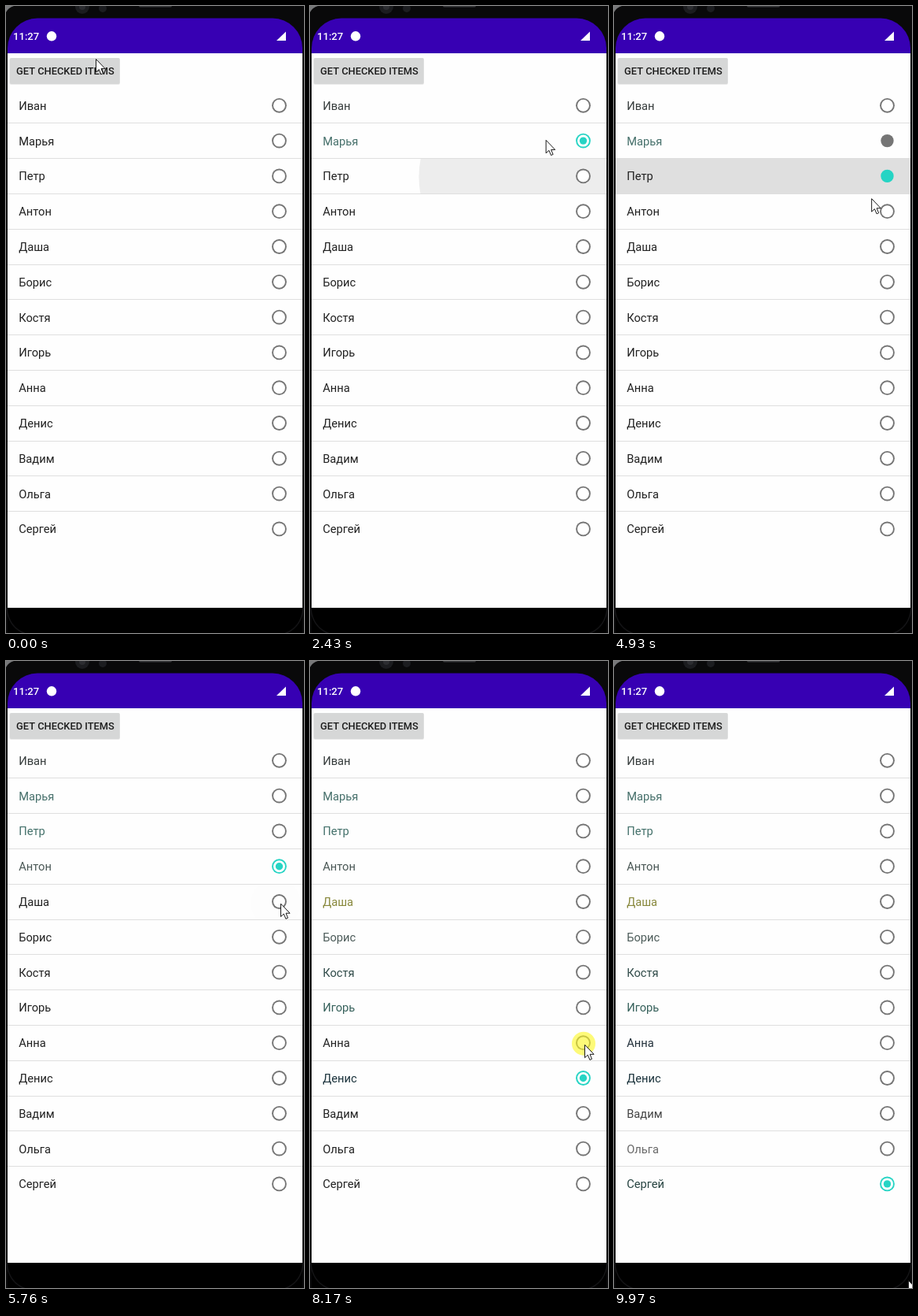
An HTML page with a canvas for the animation above (10 s loop, 379 px wide and 796 px high).

```html
<!DOCTYPE html>
<html lang="ru">
<head>
<meta charset="utf-8">
<style>
html, body { margin: 0; width: 100%; height: 100%; overflow: hidden; background: #000; }
canvas { display: block; width: 379px; height: 796px; }
</style>
</head>
<body>
<canvas id="stage"></canvas>
<script>
const W = 379, H = 796, LOOP = 10000;
const canvas = document.getElementById('stage');
const dpr = window.devicePixelRatio || 1;
canvas.width = W * dpr;
canvas.height = H * dpr;
const ctx = canvas.getContext('2d');

// Label and the colour it keeps after being tapped
const ROWS = [
  ['Иван', '#363c3c'], ['Марья', '#46706b'], ['Петр', '#43706a'], ['Антон', '#4a5755'],
  ['Даша', '#87873a'], ['Борис', '#4c5b59'], ['Костя', '#2f4a48'], ['Игорь', '#35605a'],
  ['Анна', '#22303a'], ['Денис', '#1a323b'], ['Вадим', '#444444'], ['Ольга', '#686868'],
  ['Сергей', '#264340']
];
const STEP = 44.8, FIRST = 126.3, RADIO_X = 347.5;
const GRAY = [117, 117, 117], TEAL = [38, 212, 196];
const LAG = 275, PRESS = 120, TURN = 333;

const clamp = v => Math.max(0, Math.min(1, v));
const lerp = (a, b, k) => a + (b - a) * k;
const ramp = (t, a, b) => clamp((t - a) / (b - a));
const mix = (a, b, k) => `rgb(${a.map((v, i) => Math.round(lerp(v, b[i], k)))})`;
const rowY = i => FIRST + STEP * i;

// Runs of evenly spaced taps; the list answers LAG ms after each press
const run = (rows, start, gap) =>
  rows.map((row, i) => ({ row, change: start + gap * i, down: start + gap * i - LAG }));
const TAPS = [
  ...run([0, 1, 2], 1400, 550),
  ...run([0, 1, 2], 3900, 432),
  ...run([3, 4, 5], 5340, 575),
  ...run([6, 7, 9], 7000, 350),
  ...run([8, 10, 11, 12], 8400, 350)
];

// The pointer rests on every tap and passes a few points between them
const PATH = [
  { t: 30, x: 114, y: 67 }, { t: 300, x: 49, y: 85 }, { t: 1020, x: 352, y: 172 },
  { t: 2430, x: 300, y: 170 }, { t: 2970, x: 108, y: 82 }, { t: 3170, x: 108, y: 82 },
  { t: 3770, x: 336, y: 136 }, { t: 4930, x: 327, y: 244 }, { t: 9970, x: 374, y: 786 },
  ...TAPS.flatMap(({ row, down }) =>
    [down, down + PRESS].map(t => ({ t, x: 349, y: rowY(row) + 2 })))
].sort((a, b) => a.t - b.t);

function pointerAt(t) {
  const i = PATH.findIndex(p => p.t > t);
  if (i < 1) return PATH[i === 0 ? 0 : PATH.length - 1];
  const a = PATH[i - 1], b = PATH[i], k = ramp(t, a.t, b.t);
  return { x: lerp(a.x, b.x, k), y: lerp(a.y, b.y, k) };
}

function box(x, y, w, h, color) {
  ctx.fillStyle = color;
  ctx.fillRect(x, y, w, h);
}

function disc(x, y, r, color) {
  ctx.fillStyle = color;
  ctx.beginPath();
  ctx.arc(x, y, Math.max(0, r), 0, Math.PI * 2);
  ctx.fill();
}

function roundBox(x, y, w, h, radii, color) {
  ctx.fillStyle = color;
  ctx.beginPath();
  ctx.roundRect(x, y, w, h, radii);
  ctx.fill();
}

function poly(points, color) {
  ctx.fillStyle = color;
  ctx.beginPath();
  points.forEach(([x, y]) => ctx.lineTo(x, y));
  ctx.closePath();
  ctx.fill();
}

function label(text, x, y, size, weight, color) {
  ctx.font = `${weight} ${size}px Roboto, sans-serif`;
  ctx.fillStyle = color;
  ctx.fillText(text, x, y);
}

function drawPhone() {
  box(0, 0, W, H, '#09090a');
  ctx.fillStyle = '#77787a';
  ctx.beginPath();
  ctx.moveTo(0, 0);
  ctx.lineTo(10, 0);
  ctx.quadraticCurveTo(3, 2, 0, 8);
  ctx.fill();
  disc(97, 1, 9, '#1b1c1f');
  disc(97, 1, 4, '#2c2d31');
  disc(123, 3, 5, '#1c1d20');
  roundBox(169, -4, 42, 5.5, 2, '#37383a');
  roundBox(2, 15.5, 375, 780, [38, 38, 0, 0], '#3700b3');
  box(2, 60, 375, 704, '#fefefe');
  box(2, 764, 375, 32, '#000');
  ctx.strokeStyle = '#141416';
  ctx.lineWidth = 1.5;
  for (const [edge, side] of [[1, 1], [W - 1, -1]]) {
    ctx.beginPath();
    ctx.moveTo(edge, 764);
    ctx.quadraticCurveTo(edge + side * 2, 789, edge + side * 24, 797);
    ctx.stroke();
  }
}

function drawStatus() {
  label('11:27', 9, 43, 13.1, 500, '#fff');
  disc(58, 38.3, 6.2, '#fff');
  poly([[344, 44], [356, 44], [356, 32.5]], '#fff');
}

function drawButton(t) {
  const k = ramp(t, 2850, 2960) * (1 - ramp(t, 3850, 3950));
  roundBox(4.5, 66, 140.5, 33.8, 2, 'rgba(0,0,0,.1)');
  roundBox(5, 66, 139.5, 33, 2, mix([214, 215, 215], [186, 186, 186], k));
  label('GET CHECKED ITEMS', 13, 87, 12.85, 500, '#1c1c1c');
}

function drawRipple(t, { row, down, change }) {
  const p = ramp(t, change - 160, change);
  const alpha = 0.12 * p * (1 - ramp(t, change + 170, change + 230));
  if (alpha <= 0) return;
  const touch = pointerAt(down), y = rowY(row);
  ctx.save();
  ctx.beginPath();
  ctx.rect(2, y - STEP / 2, 375, STEP);
  ctx.clip();
  disc(lerp(touch.x, W / 2, p), lerp(touch.y, y, p), lerp(26, 191, p), `rgba(0,0,0,${alpha})`);
  ctx.restore();
}

// k runs from 0 (empty ring) through 0.5 (solid) to 1 (ring and dot)
function drawRadio(row, k, color) {
  const y = rowY(row);
  const solid = 1 - Math.abs(2 * k - 1);
  disc(RADIO_X, y, 9.4 - 1.2 * solid, color);
  disc(RADIO_X, y, 7.5 * Math.min(1, (1 - solid) * (k < 0.5 ? 1 : 4)), '#fff');
  if (k > 0.5) disc(RADIO_X, y, lerp(4.7, 7.5, solid), color);
}

function textColor(row, t) {
  const own = TAPS.filter(tap => tap.row === row && tap.change - 60 < t);
  const last = own[own.length - 1];
  return last && t >= last.change + 200 ? ROWS[row][1] : '#212121';
}

function drawList(t) {
  TAPS.forEach(tap => drawRipple(t, tap));
  const [now, before] = TAPS.filter(tap => tap.change <= t).reverse();
  const p = now ? clamp((t - now.change) / TURN) : 0;
  const blend = clamp(p * 4);
  ROWS.forEach(([name], i) => {
    const y = rowY(i);
    if (i < ROWS.length - 1) box(2, Math.round(y + 22), 375, 1, '#dfdfdf');
    label(name, 16.2, Math.round(y + 5.5), 14.7, 400, textColor(i, t));
    if (now?.row === i) drawRadio(i, p, mix(GRAY, TEAL, blend));
    else if (before?.row === i) drawRadio(i, 1 - p, mix(TEAL, GRAY, blend));
    else drawRadio(i, 0, mix(GRAY, GRAY, 0));
  });
}

function drawPointer(t) {
  const { x, y } = pointerAt(t);
  if (TAPS.some(({ down }) => t >= down && t < down + PRESS)) {
    disc(x - 1, y - 1, 15, 'rgba(252,247,30,.6)');
  }
  ctx.save();
  ctx.translate(x + 0.5, y + 0.5);
  poly([[0, 0], [0, 16.5], [3.8, 13], [6.4, 19.2], [9, 18.1], [6.5, 12.1], [11.6, 12.1]], '#fff');
  ctx.strokeStyle = '#1a1a1a';
  ctx.lineWidth = 1;
  ctx.lineJoin = 'round';
  ctx.stroke();
  ctx.restore();
}

function draw(t) {
  ctx.setTransform(dpr, 0, 0, dpr, 0, 0);
  drawPhone();
  drawStatus();
  drawButton(t);
  drawList(t);
  drawPointer(t);
}

const start = performance.now();
function tick() {
  draw((performance.now() - start) % LOOP);
  requestAnimationFrame(tick);
}
tick();
</script>
</body>
</html>
```
